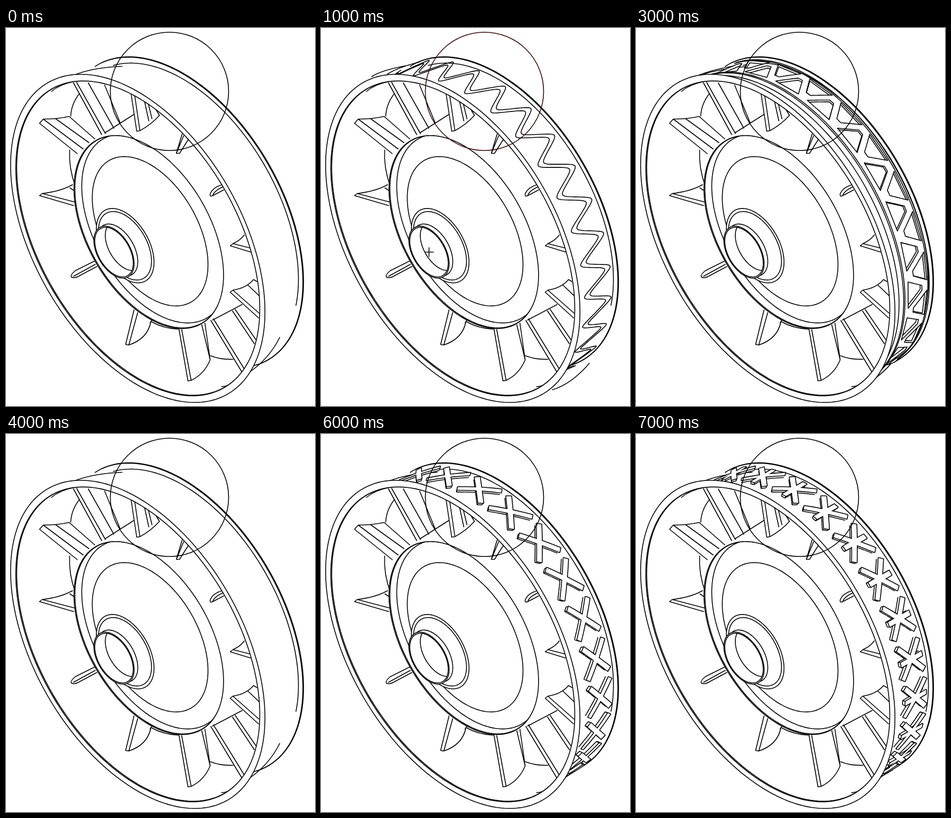
Animation of 585x716 px, one loop 8000 ms. Source, as an HTML page with a canvas:

```html
<!DOCTYPE html>
<html>
<head>
<meta charset="utf-8">
<title>Wheel tread variants</title>
<style>
html, body { margin: 0; width: 100%; height: 100%; overflow: hidden; background: #fff; }
canvas { display: block; }
</style>
</head>
<body>
<canvas id="stage" width="585" height="716"></canvas>
<script>
const ctx = document.getElementById('stage').getContext('2d');
const RAD = Math.PI / 180, COS30 = Math.sqrt(3) / 2;
const DRUM = 264, PITCH = 15, WAVE_PITCH = 360 / 29, LINE = 1.6;

// Isometric wheel: angle t in degrees, radius r, depth d along the axle.
function project(t, r, d) {
  const c = r * Math.cos(t * RAD), s = r * Math.sin(t * RAD);
  return [249 + COS30 * (c + d), 398 + c / 2 + s - d / 2];
}

function trace(points, closed) {
  ctx.beginPath();
  points.forEach(p => ctx.lineTo(p[0], p[1]));
  if (closed) ctx.closePath();
}

function shape(points, closed = true, fill = closed) {
  trace(points, closed);
  if (fill) ctx.fill();
  ctx.stroke();
}

function sample(from, to, step, fn) {
  const n = Math.ceil((to - from) / step);
  return Array.from({ length: n + 1 }, (_, i) => fn(from + (to - from) * i / n));
}

const ringPoints = (r, d, from = 0, to = 360) => sample(from, to, 2, t => project(t, r, d));
const arc = (r, d, from, to) => shape(ringPoints(r, d, from, to), false);
const ring = (r, d, fill = false) => shape(ringPoints(r, d), true, fill);
const lines = path => ctx.stroke(new Path2D(path));

function clipped(points, draw) {
  ctx.save();
  trace(points, true);
  ctx.clip();
  draw();
  ctx.restore();
}

function farFlange() {
  arc(263.4, 99, -137, 56);
  arc(263.4, 97.5, -132, 52);
  arc(253.2, 98, -127, 12);
}

function drumOutline() {
  lines('M130 88Q166 74 220 72M455 655Q497 628 518 585');
}

function barPoints([t0, d0, t1, d1], drop) {
  const k = DRUM * RAD, half = 4;
  const ds = (t1 - t0) * k, dd = d1 - d0, len = Math.hypot(ds, dd);
  const ns = -dd / len * half / k, nd = ds / len * half;
  const at = (f, side) => {
    const t = t0 + (t1 - t0) * f + ns * side, d = d0 + dd * f + nd * side;
    const p = project(t, DRUM - drop, d);
    return drop ? [p[0] - 2, p[1]] : p;
  };
  return [...sample(0, 1, 0.2, f => at(f, 1)), ...sample(0, 1, 0.2, f => at(1 - f, -1))];
}

function raisedBars(specs) {
  const tops = specs.map(s => barPoints(s, 0));
  specs.forEach((spec, n) => {
    const top = tops[n], base = barPoints(spec, 4);
    const next = i => (i + 1) % top.length;
    const area = top.reduce((sum, p, i) => {
      const q = top[next(i)];
      return sum + p[0] * q[1] - q[0] * p[1];
    }, 0);
    top.forEach((p, i) => {
      const q = top[next(i)], b = base[i], c = base[next(i)];
      const turn = (q[0] - p[0]) * (b[1] - p[1]) - (q[1] - p[1]) * (b[0] - p[0]);
      if (turn * area >= 0) return;
      trace([p, q, c, b], true);
      ctx.fill();
      shape([b, c], false);
      if (i % 6 === 5) { shape([p, b], false); shape([q, c], false); }
    });
  });
  // Stroke first, then fill, so that crossing bars share one outline.
  ctx.lineWidth = 2 * LINE;
  tops.forEach(p => shape(p, true, false));
  tops.forEach(p => { trace(p, true); ctx.fill(); });
  ctx.lineWidth = LINE;
}

// One bar per place, then a cross of two, then a star of three.
function barTread(count) {
  drumOutline();
  for (let k = -3; k <= 8; k++) {
    const t = -81 + PITCH * k, mid = t + 5.75, end = t + 11.5;
    raisedBars([[t, 38, end, 81], [t, 81, end, 36], [mid, 37, mid, 82]].slice(0, count));
  }
}

// Rounded zigzag between low and high, with a crest at angle "crest".
function waveLine(r, low, high, crest, pitch, sharp, from, to) {
  const depth = t => {
    const c = Math.cos((t - crest) / pitch * 2 * Math.PI);
    return low + (high - low) * (0.5 + Math.asin(c * sharp) / Math.asin(sharp) / 2);
  };
  shape(sample(from, to, 0.5, t => project(t, r, depth(t))), false);
}

function waveTread() {
  lines('M95 92Q112 80 160 71M125 87Q145 74 186 64M437 685Q474 674 508 634');
  const crest = -39.3 - WAVE_PITCH / 2;
  waveLine(266, 34, 81, crest, WAVE_PITCH, 0.88, -128, 38);
  waveLine(266, 22, 69, crest, WAVE_PITCH, 0.88, -131, 41);
}

function windowRow(offset, base, tip) {
  for (let k = -4; k <= 6; k++) {
    const t = -60.4 + offset + PITCH * k;
    const outline = r => [
      ...sample(0, 1, 0.1, f => project(t - 5.4 + 4.4 * f, r, base + (tip - base) * f)),
      ...sample(0, 1, 0.1, f => project(t + 1 + 4.4 * f, r, tip + (base - tip) * f))
    ];
    const edge = outline(264);
    shape(edge);
    clipped(edge, () => shape(outline(260), true, false));
  }
}

function trussTread(farRail) {
  lines('M113 91Q146 77 200 69M127 87Q158 77 214 72M445 668Q480 645 503 607');
  [20, 30, 33].forEach(d => arc(267, d, -131, 44));
  windowRow(0, 44, 73);
  if (farRail) {
    windowRow(PITCH / 2, 84, 56);
    [88, 91].forEach(d => arc(262, d, -128, 42));
  } else {
    [265, 261].forEach(r => waveLine(r, 57, 85, -60.4, PITCH, 0.93, -126, 38));
  }
}

function blades() {
  lines('M127 103L181 202M133 102L188 200M155 103L204 190M186 107L216 180' +
    'M139 123Q123 143 122 167M187 198L242 163M120 230Q118 265 131 300');
  lines('M135 238L63 180L70 172Q98 172 119 167L168 210M70 172L146 229M93 171L157 217');
  lines('M128 336L63 317L68 313Q103 309 126 296M68 313L129 329M120 302L129 308');
  lines('M167 441L131 459Q121 467 123 471Q129 475 140 468L172 451M127 470L169 447');
  lines('M242 533L226 599L232 600L249 538M232 600Q268 588 274 555M272 559L276 552' +
    'M275 556Q298 569 327 570');
  lines('M327 570L344 668L350 667L332 570M350 667Q375 655 386 628L370 561M376 558L386 628');
  lines('M387 553L446 651M392 550L451 646M386 620Q405 628 430 627' +
    'M428 535L470 598M433 532L474 592M390 553L447 523');
  lines('M478 549L424 500L429 496Q455 492 468 476L475 480M429 496L479 540M457 486L480 508');
  lines('M463 424L424 412L429 408Q443 402 451 391M429 408L461 416');
  lines('M410 296Q391 301 386 314Q385 320 391 317L412 306M391 317Q393 308 411 300');
  lines('M333 200L322 237L328 237L347 207M322 237L336 203');
  lines('M236 122L247 195L253 194L243 126M253 194Q275 182 290 165L278 145M261 135L270 176M268 139L276 172');
}

function hub() {
  const rim = ringPoints(163.5, 24), bore = ringPoints(42, -52);
  ring(163.5, 24, true);
  clipped(rim, () => {
    ring(163, 25.5);
    ring(160, 37.5);
  });
  ring(126.5, 27);
  ring(63, -27.5, true);
  ring(58, -28);
  ring(44, -44, true);
  ring(44, -52, true);
  ring(42, -52);
  clipped(bore, () => ring(41, -30));
}

function body() {
  ring(278, 0, true);
  clipped(ringPoints(266.7, 0), () => {
    blades();
    ring(266.5, 1.8);
    lines('M85 120Q101 106 128 101M407 679Q430 677 453 655');
  });
  ring(266.7, 0);
  hub();
}

const treads = [
  drumOutline,
  waveTread,
  () => trussTread(false),
  () => trussTread(true),
  drumOutline,
  () => barTread(1),
  () => barTread(2),
  () => barTread(3)
];

function render(index) {
  ctx.setTransform(1, 0, 0, 1, 0, 0);
  ctx.fillStyle = '#fff';
  ctx.strokeStyle = '#000';
  ctx.lineWidth = LINE;
  ctx.lineJoin = 'round';
  ctx.fillRect(0, 0, 585, 716);
  ctx.translate(0.5, 0.5);
  farFlange();
  treads[index]();
  body();
  if (index === 1) lines('M196 424H213M204 415V433');
  ctx.strokeStyle = index === 1 ? '#360808' : '#000';
  ctx.beginPath();
  ctx.arc(309, 119.5, 112, 0, 2 * Math.PI);
  ctx.stroke();
}

const start = performance.now();
let shown = -1;
function tick() {
  const index = Math.floor((performance.now() - start) / 1000) % treads.length;
  if (index !== shown) render(shown = index);
  requestAnimationFrame(tick);
}
tick();
</script>
</body>
</html>
```
